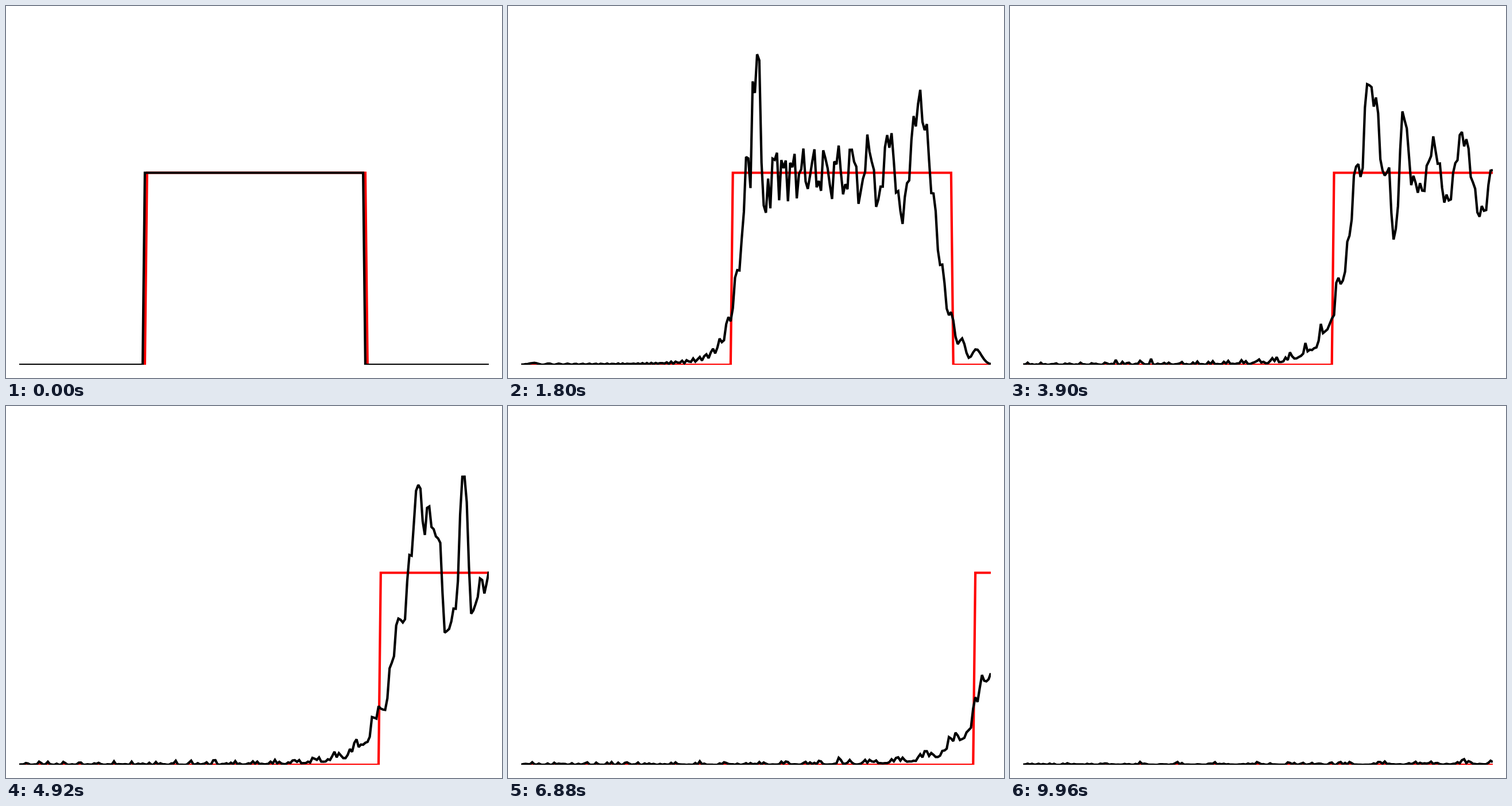
Recreate the animation shown at these times as an HTML page with a canvas. Size 864x648 px, loop 9980 ms.

```html
<!DOCTYPE html>
<html lang="en">
<head>
<meta charset="utf-8">
<title>Wave packet on a lattice</title>
<style>
  html, body { margin: 0; width: 100%; height: 100%; overflow: hidden; background: #fff; }
  canvas { display: block; width: 864px; height: 648px; }
</style>
</head>
<body>
<canvas id="stage" width="864" height="648"></canvas>
<script>
const LOOP = 9980, STEPS = 215;
const SITES = 500, SHOWN = 214;          // the lattice runs on past the right edge
const FIRST = 57, WIDTH = 100;           // initial box
const HOP = Math.SQRT1_2, K0 = Math.PI / 4; // group velocity: one site per step
const LEFT = 23, RIGHT = 841, BASE = 625, UNIT = 334.5;
const DX = (RIGHT - LEFT) / (SHOWN - 1);

const ctx = document.getElementById('stage').getContext('2d');

// One unit of time of i dψ/dt = -HOP (ψ[j-1] + ψ[j+1]), as a Taylor series
function advance(re, im) {
  let tr = re.slice(), ti = im.slice();
  for (let m = 1; m <= 18; m++) {
    const nr = new Float64Array(SITES), ni = new Float64Array(SITES), c = HOP / m;
    for (let j = 0; j < SITES; j++) {
      const a = j > 0 ? j - 1 : -1, b = j < SITES - 1 ? j + 1 : -1;
      nr[j] = -c * ((a < 0 ? 0 : ti[a]) + (b < 0 ? 0 : ti[b]));
      ni[j] = c * ((a < 0 ? 0 : tr[a]) + (b < 0 ? 0 : tr[b]));
      re[j] += nr[j];
      im[j] += ni[j];
    }
    tr = nr;
    ti = ni;
  }
}

function simulate() {
  const re = new Float64Array(SITES), im = new Float64Array(SITES), out = [];
  for (let j = FIRST; j < FIRST + WIDTH; j++) {
    re[j] = Math.cos(K0 * j);
    im[j] = Math.sin(K0 * j);
  }
  for (let n = 0; n < STEPS; n++) {
    out.push(Float64Array.from({ length: SHOWN }, (_, j) => re[j] ** 2 + im[j] ** 2));
    advance(re, im);
  }
  return out;
}

function plot(color, value) {
  ctx.beginPath();
  for (let j = 0; j < SHOWN; j++) ctx.lineTo(LEFT + j * DX, BASE - UNIT * value(j));
  ctx.strokeStyle = color;
  ctx.stroke();
}

const density = simulate();
let current = -1;

function draw(n) {
  ctx.fillStyle = '#fff';
  ctx.fillRect(0, 0, 864, 648);
  const start = FIRST + 1 + n;
  plot('#f00', j => (j >= start && j < start + WIDTH ? 1 : 0));
  plot('#000', j => density[n][j]);
}

// Steps last 20, 100 and 20 ms in turn
function stepAt(ms) {
  const r = ms % 140;
  return 3 * Math.floor(ms / 140) + (r < 20 ? 0 : r < 120 ? 1 : 2);
}

function tick() {
  const n = Math.min(STEPS - 1, stepAt(performance.now() % LOOP));
  if (n !== current) draw(current = n);
  requestAnimationFrame(tick);
}

ctx.beginPath();
ctx.rect(LEFT, 0, RIGHT - LEFT, BASE);
ctx.clip();
ctx.lineWidth = 4.2;
ctx.lineJoin = 'miter';
ctx.miterLimit = 2;
tick();
</script>
</body>
</html>
```
